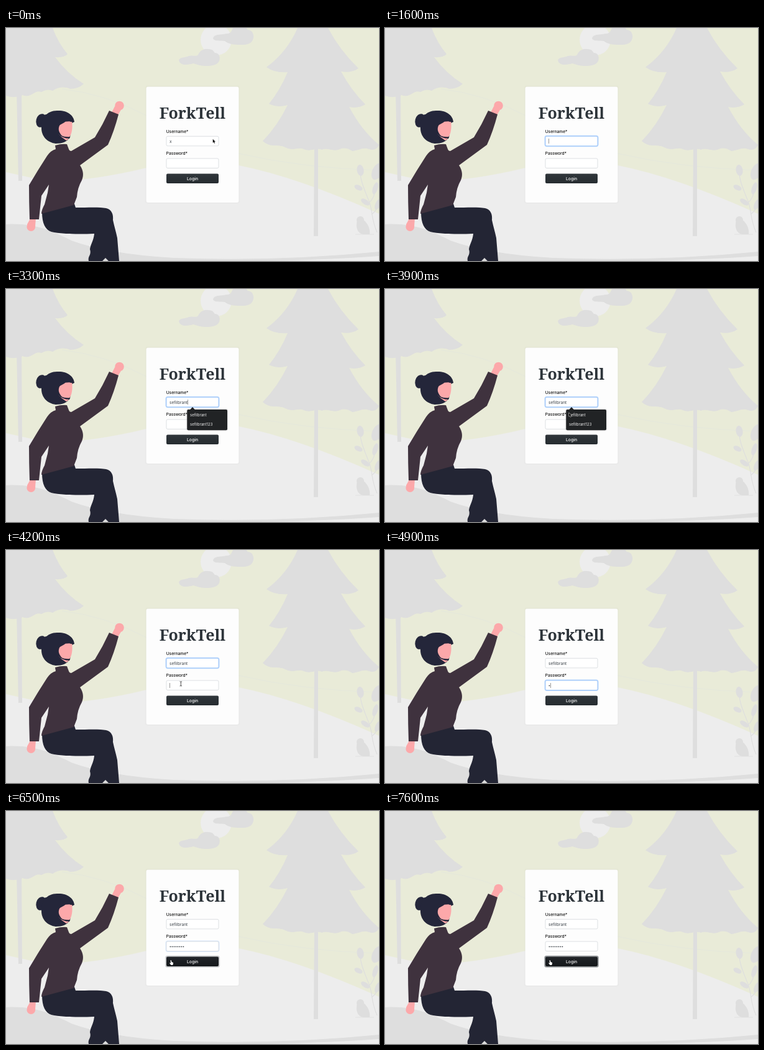
An HTML page with a canvas that plays this animation: 600x375 px, repeating every 8 s.

```html
<!DOCTYPE html>
<html lang="en">
<head>
<meta charset="utf-8">
<title>Login</title>
<style>
  html, body { margin: 0; width: 100%; height: 100%; overflow: hidden; background: #e9ebd8; }
  canvas { display: block; width: 600px; height: 375px; }
</style>
</head>
<body>
<canvas id="stage"></canvas>
<script>
const LOOP = 8000;
const SANS = 'Inter, "Open Sans", sans-serif';
const NAME = 'sefilbrant';
const SUGGESTIONS = [NAME, NAME + '123', NAME.slice(0, 3)];
const NAME_KEYS = [2200, 2300, 2400, 2500, 2700, 2900, 3000, 3100, 3200, 3300];
const PASS_KEYS = [4900, 5000, 5100, 5200, 5400, 5500, 5600, 5700];
const GREY = '#dedede', PALE = '#ededed', HAIR = '#24263a', KNIT = '#3f323e',
      SKIN = '#fca8aa', TROUSERS = '#232534';

const canvas = document.getElementById('stage');
const ctx = canvas.getContext('2d');
const ratio = window.devicePixelRatio || 1;
canvas.width = 600 * ratio;
canvas.height = 375 * ratio;

const within = (t, from, to) => t >= from && t < to;
const ramp = (t, from, to) => Math.min(1, Math.max(0, (t - from) / (to - from)));
const ease = p => p * p * (3 - 2 * p);
const typed = (keys, t) => keys.filter(k => k <= t).length;

function shape(d, color) {
  ctx.fillStyle = color;
  ctx.fill(new Path2D(d));
}

function line(d, color, width) {
  ctx.strokeStyle = color;
  ctx.lineWidth = width;
  ctx.stroke(new Path2D(d));
}

function oval(x, y, rx, ry, color, turn = 0) {
  ctx.fillStyle = color;
  ctx.beginPath();
  ctx.ellipse(x, y, rx, ry, turn, 0, Math.PI * 2);
  ctx.fill();
}

function box(x, y, w, h, r, fill, stroke, width = 0.7) {
  ctx.beginPath();
  ctx.roundRect(x, y, w, h, r);
  if (fill) { ctx.fillStyle = fill; ctx.fill(); }
  if (stroke) { ctx.strokeStyle = stroke; ctx.lineWidth = width; ctx.stroke(); }
}

function text(str, x, y, size, color, align = 'left', weight = 400) {
  ctx.font = `${weight} ${size}px ${SANS}`;
  ctx.textAlign = align;
  ctx.fillStyle = color;
  ctx.fillText(str, x, y);
  return ctx.measureText(str).width;
}

function drawLandscape() {
  ctx.fillStyle = '#e9ebd8';
  ctx.fillRect(0, 0, 600, 375);
  line('M90 98Q160 106 226 141M374 202Q480 226 600 229', '#e5e8dc', 1);
  oval(338, 19, 25, 25, PALE);
  shape('M333 17C334 10 343 11 350 10C356 8 361 11 364 2L368 -3H384L389 3C396 3 399 10 398 16C396 26 387 27 378 27C366 27 358 26 352 21C345 20 335 22 333 17Z', GREY);
  shape('M278 52C280 46 289 48 294 45C300 43 306 47 309 43C313 35 319 33 326 34C333 34 334 38 336 40C343 40 345 47 343 53C339 61 329 61 320 61C312 61 306 58 301 57C295 59 280 62 278 52Z', GREY);
  shape('M0 232Q35 240 70 247Q140 246 226 225Q300 208 374 221Q470 240 600 299V375H0Z', PALE);
  drawTrees();
  shape('M0 316C45 313 75 327 105 342Q165 364 270 370Q440 376 600 360V367Q470 376 360 375H0Z', GREY);
  drawPlant();
}

function drawTrees() {
  shape('M17 96H25L26 246H20Z', GREY);
  shape('M0 0H75Q84 24 99 42Q94 48 79 47Q98 73 125 90Q116 98 103 98C94 94 84 95 75 101Q66 97 57 103C45 99 41 114 27 108Q14 114 0 109Z', GREY);
  shape('M496 188H502L502 335H495Z', GREY);
  shape('M469 0H518Q537 36 567 65Q555 73 539 70Q555 100 578 123Q566 130 552 127Q572 165 600 188Q595 199 584 195C575 191 567 197 557 198Q546 191 537 195C526 200 519 192 508 196C497 192 490 200 479 195C470 191 462 199 449 192C437 186 427 194 413 182Q437 157 453 124Q437 129 423 122Q441 100 453 71Q433 73 419 63Q452 39 469 0Z', GREY);
}

function drawPlant() {
  line('M597 329C586 305 591 292 582 274C576 258 570 246 570 232M584 281Q594 273 595 252M588 300Q599 292 600 278', GREY, 1.2);
  oval(570, 229, 5.5, 9, GREY, -0.15);
  oval(597, 231, 8, 14, GREY, 0.4);
  oval(567, 257, 7, 4, GREY, 0.45);
  oval(594, 258, 4, 10, GREY, 0.3);
  oval(578, 280, 8, 4, GREY, 0.6);
  oval(598, 284, 4, 9, GREY, 0.4);
  oval(570, 309, 6, 6, GREY);
  shape('M565 309C562 321 565 330 574 332H585C586 323 582 314 575 309Z', GREY);
  line('M562 332H592', GREY, 0.8);
}

function drawWoman() {
  shape('M40 305H48L47 320L36 324L34 316Z', SKIN);
  oval(40.3, 320.3, 6.8, 6.8, SKIN);
  shape('M170 136L175 126L186 130L180 140Z', SKIN);
  oval(182.5, 125, 7.3, 7.3, SKIN);
  shape('M58 297L110 283L112 289C132 289 151 288 161 290C170 292 173 300 172 309C174 319 177 328 179 338L182 375H165L160 370L155 375H133C131 367 138 366 135 356C136 348 141 342 142 331C119 332 91 332 73 328C63 325 58 314 58 297Z', TROUSERS);
  shape('M79 189Q89 186 98 187L101 195Q102 198 105 198L143 176Q156 155 166 133L181 139Q174 166 164 188L119 221C125 230 125 238 122 245Q115 257 114 272L109 285L57 299Q57 293 62 284L67 265L69 252L57 270L53 308H38Q37 280 37 253Q51 229 66 206Q72 197 80 195Z', KNIT);
  oval(56.5, 149, 8, 11, HAIR, 0.25);
  oval(65, 145, 6, 6, HAIR);
  shape('M57 161C56 145 66 133 82 133C98 132 109 140 110 151L106 153L103 176C98 183 91 186 80 186C66 184 57 174 57 161Z', HAIR);
  shape('M85 165C84 159 87 154 91 151L106 150C108 164 105 177 96 180C92 175 87 172 85 165Z', SKIN);
  shape('M82 167C86 173 93 176 103 175L102 178Q91 180 82 175Z', HAIR);
  shape('M84 170Q91 178 102 178L97 181Q90 177 84 170Z', SKIN);
  shape('M86 143Q101 137 110 151L104 151L98 148L94 152L85 157Z', HAIR);
}

function drawField(x, y, focus) {
  if (focus > 0) {
    ctx.globalAlpha = focus;
    box(x - 0.6, y - 0.6, 85.2, 16.7, 2.8, null, '#bcd8fc', 1.7);
    ctx.globalAlpha = 1;
  }
  box(x, y, 84, 15.5, 2, '#fff', focus > 0.5 ? '#83b6f6' : '#cfd3d7');
}

function drawButton(t) {
  const hover = t >= 6300, ring = ramp(t, 6400, 6600);
  if (ring) {
    ctx.globalAlpha = ring;
    box(257.2, 233.7, 85.6, 17, 2.5, null, '#94989b', 2);
    ctx.globalAlpha = 1;
  }
  const shade = ctx.createLinearGradient(0, 234, 0, 250);
  shade.addColorStop(0, hover ? '#212529' : '#30363b');
  shade.addColorStop(1, hover ? '#15181b' : '#262c30');
  box(258, 234.4, 84, 15.5, 2, shade);
  text('Login', 300, 244.7, 6.8, '#fff', 'center', 500);
}

function drawCaret(x, y) {
  ctx.fillStyle = '#555';
  ctx.fillRect(x, y, 0.6, 8);
}

function drawForm(t) {
  ctx.shadowColor = 'rgba(0,0,0,.08)';
  ctx.shadowBlur = 2;
  box(225.5, 94.5, 149, 186.5, 3, '#fdfdfd');
  ctx.shadowBlur = 0;
  ctx.font = 'bold 25px "Noto Serif", serif';
  ctx.textAlign = 'center';
  ctx.fillStyle = '#2d343a';
  ctx.fillText('ForkTell', 300, 145.7);
  text('Username*', 257.7, 168.6, 6.6, '#111', 'left', 500);
  text('Password*', 257.7, 204.4, 6.6, '#111', 'left', 500);

  drawField(258, 174.3, t < 4200 ? ramp(t, 600, 800) : 1 - ramp(t, 4200, 4400));
  drawField(258, 210, t < 6300 ? ramp(t, 4200, 4400) : 1 - ramp(t, 6400, 6600));
  drawButton(t);

  const name = t < 1100 ? 'x' : NAME.slice(0, typed(NAME_KEYS, t));
  const nameWidth = text(name, 263, 184.6, 6.6, '#3c4349');
  const dots = typed(PASS_KEYS, t);
  for (let i = 0; i < dots; i++) oval(264.4 + i * 3, 218.3, 0.9, 0.9, '#343a40');

  if (within(t, 700, 1100) || within(t, 1300, 1800) || within(t, 2200, 3800))
    drawCaret(263 + nameWidth, 178);
  if (within(t, 4200, 4700) || within(t, 4900, 6200))
    drawCaret(263 + dots * 3, 214);
  if (within(t, 2200, 4200)) drawSuggestions(t < 2500 ? 3 : 2);
}

function drawSuggestions(count) {
  ctx.shadowColor = 'rgba(0,0,0,.3)';
  ctx.shadowBlur = 2;
  box(291.3, 194, 64.7, 3 + count * 15.1, 2, '#212325');
  ctx.shadowBlur = 0;
  shape('M296 194.3L300 190L304 194.3Z', '#212325');
  SUGGESTIONS.slice(0, count).forEach((s, i) => text(s, 296, 205.2 + i * 15, 6, '#eee'));
}

const POINTERS = {
  arrow: ['M0 0V6L1.4 4.8L2.4 7L3.4 6.5L2.5 4.4H4.2Z', '#111', '#fff'],
  hand: ['M-1 -3.5Q0 -4.5 .6 -3L1 -1L3.2 -.2Q4 .5 3.4 2L2.8 4H0L-2.5 .8Q-2 -.2 -.5 .8Z', '#fff', '#111']
};

function drawPointer(kind, x, y) {
  ctx.save();
  ctx.translate(x, y);
  if (kind === 'beam') {
    line('M-1.7 -3.6Q0 -3.6 0 -2.7Q0 -3.6 1.7 -3.6M0 -2.7V2.7M-1.7 3.6Q0 3.6 0 2.7Q0 3.6 1.7 3.6', '#222', 0.8);
  } else {
    const [d, fill, edge] = POINTERS[kind];
    line(d, edge, 0.8);
    shape(d, fill);
  }
  ctx.restore();
}

function glide(kind, p, x0, y0, x1, y1) {
  const k = ease(p);
  drawPointer(kind, x0 + (x1 - x0) * k, y0 + (y1 - y0) * k);
}

function drawMouse(t) {
  if (t < 100) drawPointer('arrow', 332.7, 178.7);
  else if (t < 1100) glide('beam', ramp(t, 0, 200), 333, 182, 310.5, 183);
  else if (within(t, 3800, 4900))
    glide(within(t, 3900, 4000) ? 'arrow' : 'beam', ramp(t, 3700, 4100), 310.5, 183, 281.3, 215.3);
  else if (t >= 6100)
    glide(t < 6300 ? 'beam' : 'hand', ramp(t, 6000, 6400), 281.3, 215.3, 265.5, 244);
}

function render(now) {
  const t = Math.floor(now % LOOP / 100) * 100;
  ctx.setTransform(ratio, 0, 0, ratio, 0, 0);
  drawLandscape();
  drawWoman();
  drawForm(t);
  drawMouse(t);
}

const start = performance.now();
function tick(now) {
  render(Math.max(0, now - start));
  requestAnimationFrame(tick);
}
render(0);
requestAnimationFrame(tick);
</script>
</body>
</html>
```
